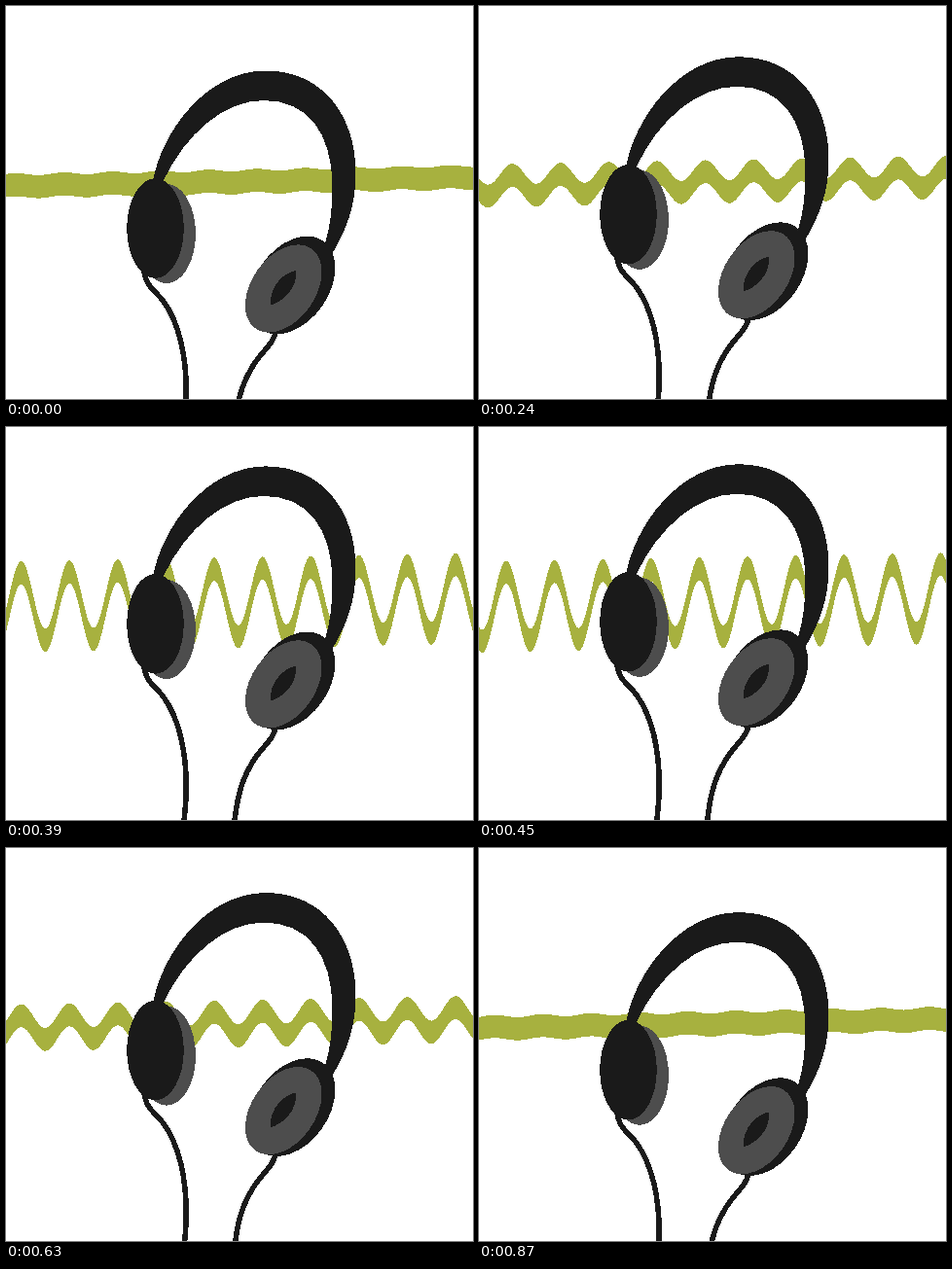
Write an HTML page that moves like this. It is 480 px wide and 404 px high and loops after 900 ms.

```html
<!DOCTYPE html>
<html lang="en">
<head>
<meta charset="utf-8">
<title>Headphones</title>
<style>
  html, body { margin: 0; width: 100%; height: 100%; overflow: hidden; background: #fff; }
  svg { display: block; width: 480px; height: 404px; }
</style>
</head>
<body>
<svg viewBox="0 0 480 404" shape-rendering="crispEdges">
  <path id="wave" fill="#a7b13f"/>
  <g id="phones" fill="#1a1a1a">
    <g fill="none" stroke="#1a1a1a" stroke-width="5.5">
      <path d="M141.500 270C144 289 151 290 161.500 303C177.500 325 186.500 360 185 404C185 415 183.500 425 182 440"/>
      <path d="M277.500 334C274 350 261.500 355 251.500 374C242 390 237 408 234 440"/>
    </g>
    <path d="M151 180C159.500 131 205 66.500 267 66.500C325 66.500 359.500 112 359.500 172C359.500 205 350 230 335 255L328 244C334 225 335.500 205 335.500 185C335 130 310 97 265 97C225 97 185 130 161 181Z"/>
    <ellipse cx="165" cy="234" rx="30" ry="51" fill="#4d4d4d"/>
    <ellipse cx="153.500" cy="228.500" rx="29.300" ry="51.200"/>
    <ellipse rx="37.700" ry="55.500" transform="translate(294 287) rotate(35)"/>
    <ellipse rx="32.800" ry="50" transform="translate(285.200 290.500) rotate(35)" fill="#4d4d4d"/>
    <path d="M298 272C287 273 270 288 272 307.500C283 305 300 291 298 272Z"/>
  </g>
</svg>
<script>
const LOOP = 900, STEP = 30, PEAK = 480, LIFT = 28.5;
const WAVELENGTH = 49.6, WAVE_PERIOD = 240, THICKNESS = 23.7;
const AMPLITUDE = [[0, -1.2], [240, 10.5], [390, 35], [422, 38.5], [510, 28.2], [600, 13.8], [900, 0]];
const wave = document.getElementById('wave');
const phones = document.getElementById('phones');

function amplitudeAt(t) {
  const i = AMPLITUDE.findIndex(([time]) => time > t);
  const [t0, a0] = AMPLITUDE[i - 1], [t1, a1] = AMPLITUDE[i];
  return a0 + (a1 - a0) * (t - t0) / (t1 - t0);
}

function wavePath(t) {
  const amplitude = amplitudeAt(t);
  const crest = 34.2 + WAVELENGTH * t / WAVE_PERIOD;
  const top = [], bottom = [];
  for (let x = -2; x <= 482; x++) {
    const y = 173.3 - 0.0187 * x - amplitude * Math.cos(2 * Math.PI * (x - crest) / WAVELENGTH);
    top.push(`${x} ${y.toFixed(2)}`);
    bottom.unshift(`${x} ${(y + THICKNESS).toFixed(2)}`);
  }
  return `M${top.join('L')}L${bottom.join('L')}Z`;
}

function render(now) {
  const t = Math.floor(now % LOOP / STEP) * STEP;
  const turn = t < PEAK ? t / PEAK : (LOOP - t) / (LOOP - PEAK);
  const lift = LIFT * (1 - Math.cos(Math.PI * turn)) / 2;
  phones.setAttribute('transform', `translate(0 ${-lift})`);
  wave.setAttribute('d', wavePath(t));
}

function tick() {
  render(performance.now());
  requestAnimationFrame(tick);
}
tick();
</script>
</body>
</html>
```
